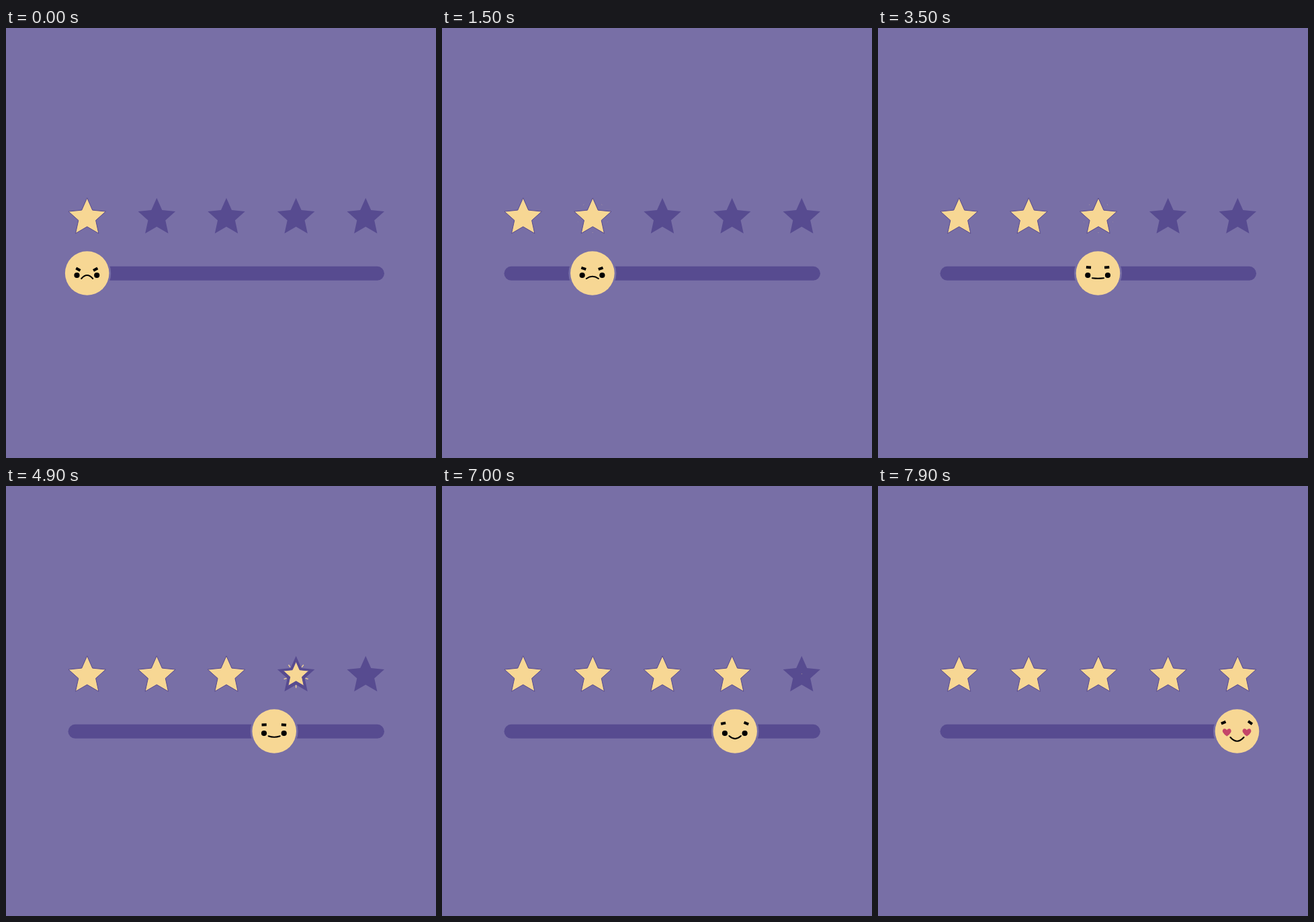
Write an HTML page with a canvas that moves like this. It is 640 by 640 pixels and loops after 8 s.

```html
<!DOCTYPE html>
<html lang="en">
<head>
<meta charset="utf-8">
<title>Star rating slider</title>
<style>
  html, body { margin: 0; height: 100%; overflow: hidden; background: #786fa6; }
  canvas { display: block; }
</style>
</head>
<body>
<canvas id="stage" width="640" height="640"></canvas>
<script>
const ctx = document.getElementById('stage').getContext('2d');
const BG = '#786fa6', DARK = '#574b90', GOLD = '#f7d794', PINK = '#c44569', INK = '#000';
const LOOP = 8000, FIRST_X = 120.7, GAP = 103.65, FACE_Y = 365;
const STARTS = [460, 2490, 4575, 6956];

// One value per rating, from angry to in love
const MOOD = {
  browX: [13, 12.8, 13.7, 17.2, 20],
  browY: [359.2, 358, 356.3, 353.3, 352.3],
  leftTilt: [30, 17, 3, -11, -23],
  rightTilt: [-30, -20, -4, 22, 35],
  mouthHalf: [8.5, 9, 8.5, 8.7, 10],
  mouthY: [373, 373, 372.3, 372, 374],
  mouthSag: [-5, -3.2, 0.5, 4, 5.8],
  love: [0, 0, 0, 0, 1]
};

const clamp = v => Math.max(0, Math.min(1, v));
const starX = i => FIRST_X + GAP * i;

// Critically damped spring from 0 to 1
function spring(ms) {
  const k = Math.max(0, ms) * 0.0073;
  return 1 - (1 + k) * Math.exp(-k);
}

function smooth(v) {
  v = clamp(v);
  return v * v * (3 - 2 * v);
}

function disc(x, y, r, color) {
  ctx.fillStyle = color;
  ctx.beginPath();
  ctx.arc(x, y, r, 0, Math.PI * 2);
  ctx.fill();
}

function starPath(x, scale) {
  const cy = 279.35 + 2.75 * scale;
  ctx.beginPath();
  for (let i = 0; i < 10; i++) {
    const r = (i % 2 ? 13.6 : 29.2) * scale, a = i * Math.PI / 5;
    ctx.lineTo(x + r * Math.sin(a), cy - r * Math.cos(a));
  }
  ctx.closePath();
}

function drawRays(x, p) {
  const len = 4.5 * Math.sin(Math.PI * clamp((p - 0.5) / 0.5));
  if (len < 0.1) return;
  const outer = 10 + 13 * p;
  ctx.strokeStyle = GOLD;
  ctx.lineWidth = 1.4;
  ctx.beginPath();
  for (let i = 0; i < 5; i++) {
    const a = (i + 0.5) * Math.PI * 0.4, s = Math.sin(a), c = Math.cos(a);
    ctx.moveTo(x + s * (outer - len), 281.5 - c * (outer - len));
    ctx.lineTo(x + s * outer, 281.5 - c * outer);
  }
  ctx.stroke();
}

function drawStar(i, p) {
  const x = starX(i);
  starPath(x, 1);
  ctx.fillStyle = DARK;
  ctx.fill();
  if (p < 0.01) return;
  if (i > 0 && i < 4) drawRays(x, p);
  starPath(x, p);
  ctx.fillStyle = GOLD;
  ctx.fill();
  ctx.strokeStyle = DARK;
  ctx.lineWidth = 1;
  ctx.stroke();
}

function drawBrow(x, y, tilt) {
  ctx.save();
  ctx.translate(x, y);
  ctx.rotate(tilt * Math.PI / 180);
  ctx.fillStyle = INK;
  ctx.fillRect(-3.6, -2, 7.2, 4);
  ctx.restore();
}

function drawHeart(x, y, scale) {
  ctx.save();
  ctx.translate(x, y);
  ctx.scale(scale, scale);
  ctx.fillStyle = PINK;
  ctx.beginPath();
  ctx.moveTo(0, -3.2);
  ctx.bezierCurveTo(-2, -7.2, -8, -5.5, -6, 0);
  ctx.quadraticCurveTo(-4.5, 3, 0, 6);
  ctx.quadraticCurveTo(4.5, 3, 6, 0);
  ctx.bezierCurveTo(8, -5.5, 2, -7.2, 0, -3.2);
  ctx.fill();
  ctx.restore();
}

function drawFace(x, m) {
  disc(x, FACE_Y, 35.5, BG);
  disc(x, FACE_Y, 32.8, GOLD);
  x -= 0.3;
  drawBrow(x - m.browX, m.browY, m.leftTilt);
  drawBrow(x + m.browX - 0.2, m.browY, m.rightTilt);
  for (const dx of [-14.9, 14.8]) {
    disc(x + dx, 368, 4.1 * (1 - 0.6 * m.love), INK);
    if (m.love > 0.01) drawHeart(x + dx, 368 - 1.4 * m.love, m.love);
  }
  ctx.strokeStyle = INK;
  ctx.lineWidth = 2.1;
  ctx.lineCap = 'round';
  ctx.beginPath();
  ctx.moveTo(x + 0.3 - m.mouthHalf, m.mouthY);
  ctx.quadraticCurveTo(x + 0.3, m.mouthY + 2 * m.mouthSag, x + 0.3 + m.mouthHalf, m.mouthY);
  ctx.stroke();
  ctx.lineCap = 'butt';
}

function draw(t) {
  ctx.fillStyle = BG;
  ctx.fillRect(0, 0, 640, 640);

  const fills = [1, ...STARTS.map(s => spring(t - s))];
  fills.forEach((p, i) => drawStar(i, p));

  ctx.fillStyle = DARK;
  ctx.beginPath();
  ctx.roundRect(92.5, 354.8, 470.5, 21, 10.5);
  ctx.fill();

  const step = Math.max(0, STARTS.filter(s => s <= t).length - 1);
  const mix = smooth((t - STARTS[step]) / 900);
  const mood = {};
  for (const key in MOOD) {
    const v = MOOD[key];
    mood[key] = v[step] + (v[step + 1] - v[step]) * mix;
  }
  drawFace(starX(step + fills[step + 1]), mood);
}

const begin = performance.now();
function tick() {
  draw((performance.now() - begin) % LOOP);
  requestAnimationFrame(tick);
}
tick();
</script>
</body>
</html>
```
